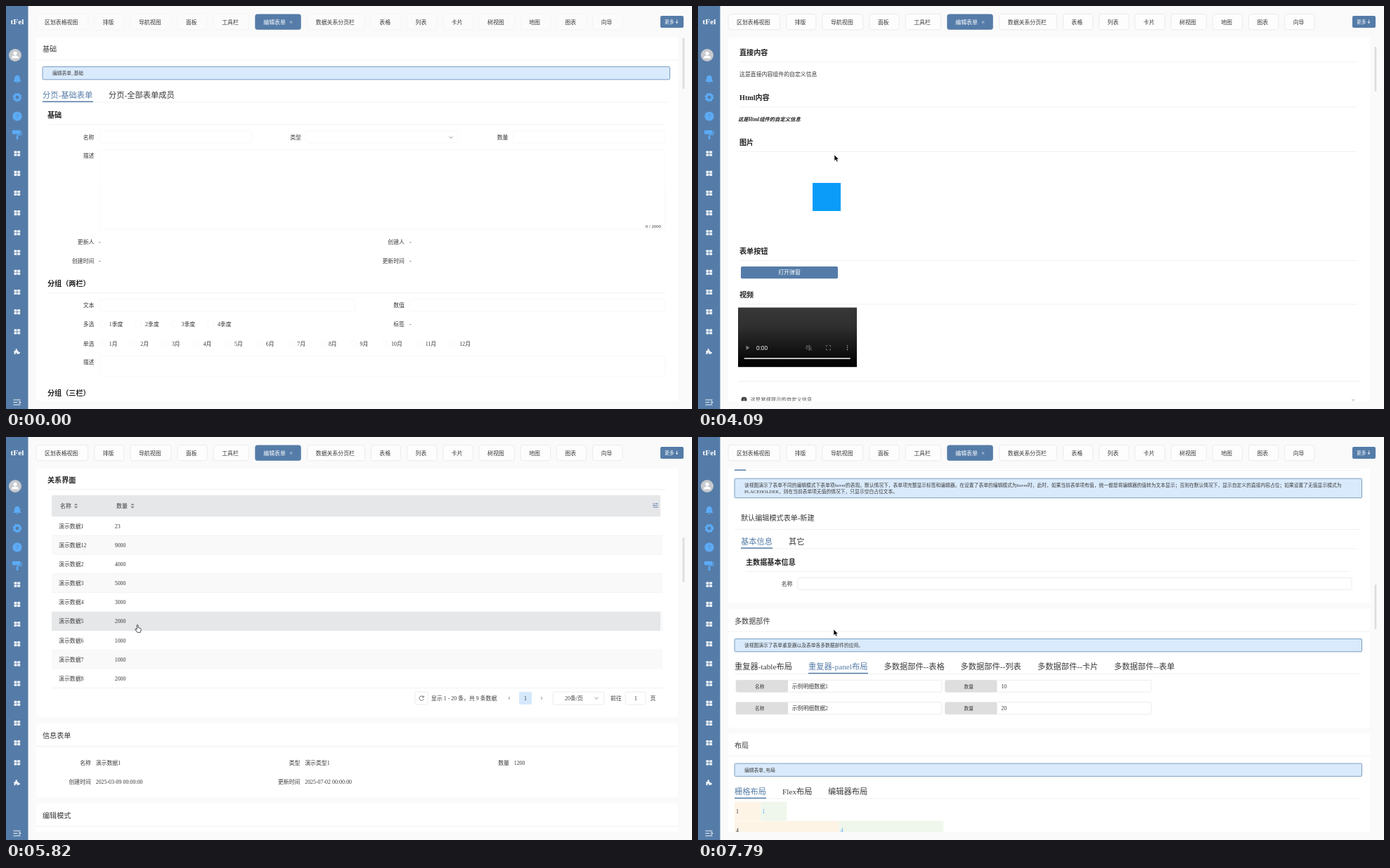
Recreate the animation shown at these times as an HTML page. Size 976 by 574 pixels, loop 8 s.

```html
<!DOCTYPE html>
<html>
<head>
<meta charset="utf-8">
<style>
html, body { margin: 0; width: 100%; height: 100%; overflow: hidden; background: #fafafa; }
svg { display: block; width: 976px; height: 574px; }
text { font-family: "Liberation Serif", "Noto Sans CJK SC", "Noto Sans CJK", serif; fill: #3a3a3a; white-space: pre; }
.b { font-weight: bold; fill: #222; }
.e { text-anchor: end; }
.m { text-anchor: middle; }
.blue { fill: #557ca8; }
.white { fill: #fff; }
.edge { stroke: #e7e7e7; stroke-width: .8; opacity: var(--edge, 1); }
.icon { fill: none; stroke: #777; stroke-width: .8; }
</style>
</head>
<body>
<svg id="stage" viewBox="0 0 976 574"></svg>
<script>
const S = 6.77, M = 7.9, L = 10.15, XL = 11.28;
const BLUE = '#557ca8', SKY = '#5cabf6', GREY = '#e6e7e9';

// ---- drawing helpers, all returning SVG markup
const text = (x, y, s, size = M, cls = '', extra = '') =>
  `<text x="${x}" y="${y + size * .37}" font-size="${size}" class="${cls}" ${extra}>${s}</text>`;
const rect = (x, y, w, h, fill, extra = '') =>
  `<rect x="${x}" y="${y}" width="${w}" height="${h}" fill="${fill}" ${extra}/>`;
const path = (d, extra = 'class="icon"') => `<path d="${d}" ${extra}/>`;
const circle = (x, y, r, fill, extra = '') => `<circle cx="${x}" cy="${y}" r="${r}" fill="${fill}" ${extra}/>`;
const shift = (dy, ...parts) => `<g transform="translate(0,${dy})">${parts.join('')}</g>`;
const each = (list, fn) => list.map(fn).join('');
const range = (n, fn) => each([...Array(n).keys()], fn);

const rule = (x, y, x2) => rect(x, y - .4, x2 - x, .8, '#ededed');
const underline = (x, y, w) => rect(x, y - .7, w, 1.5, BLUE);
const label = (x, y, s) => text(x, y, s, M, 'e');
const input = (x, y, x2, h = 17) => rect(x, y, x2 - x, h, '#fff', 'rx="2" class="edge"');
const group = (y, s, x = 59, x2 = 938) => text(x, y, s, L, 'b') + rule(x, y + 13.3, x2);
const card = (y, y2) => rect(43, y, 913, y2 - y, '#fff', 'rx="3"');
const panelTitle = (y, s) => text(52, y, s, L) + rule(43, y + 15, 956);
const chevron = (x, y) => path(`M${x - 2.5} ${y - 1.2}l2.5 2.5 2.5 -2.5`);
const cross = (x, y, c = '#999') => path(`M${x - 1.7} ${y - 1.7}l3.4 3.4m0 -3.4l-3.4 3.4`, `stroke="${c}" stroke-width=".7"`);
const notice = (y, h, ...lines) =>
  rect(52, y, 892.5, h, '#d9eafc', 'rx="1.5" stroke="#6f94bb" stroke-width=".9"') +
  lines.map((s, i) => text(66, y + 9.3 + i * 8.6, s, S)).join('');
const tabs = (y, size, active, items) =>
  items.map(([x, s], i) => text(x, y, s, size, i === active ? 'blue' : '')).join('');

// ---- fixed frame: sidebar and view tabs
function sidebar() {
  const grid = y => each([[-4.3, -3.5], [.4, -3.5], [-4.3, .4], [.4, .4]], ([dx, dy]) =>
    rect(15.8 + dx, y + dy, 4, 3.3, '#edf2f7', 'rx=".7"'));
  return rect(0, 0, 31.5, 574, BLUE) + text(16, 22, 'tFel', 11.4, 'b m', 'style="fill:#fff"') +
    circle(13, 70, 9, '#c6c9ce') + circle(13, 67.3, 2.6, '#fff') + path('M8 74.6q0-4 5-4t5 4z', 'fill="#fff"') +
    path('M10.5 108q1.5-1 1.5-4.500q0-4 4-5q4 1 4 5q0 3.500 1.500 4.500zM14.500 109h3l-1.500 1.500z', `fill="${SKY}"`) +
    circle(16, 130, 4, 'none', `stroke="${SKY}" stroke-width="3"`) +
    circle(16, 130, 5.6, 'none', `stroke="${SKY}" stroke-width="1.600" stroke-dasharray="2.200 2.200"`) +
    circle(16, 157, 6.6, SKY) + text(16, 157, '?', 8, 'm', 'style="fill:#557ca8"') +
    path('M9.500 177.500h10.500v4.500h-10.500zM20.500 179h1.500v4.500h-6v2', `fill="none" stroke="${SKY}"`) +
    rect(9.5, 177.5, 10.5, 4.5, SKY) + rect(14.7, 184.5, 2.6, 5.5, SKY) +
    range(10, i => grid(210 + i * 28.2)) +
    path('M11.500 496v-5h2.200q-1-2.800 1-2.800t1 2.800h1.800v2q2.500-1 2.500 1t-2.500 1v1h-2v-2h-1.800v2z', 'fill="#edf2f7"') +
    path('M10.500 561h10M10.500 564.500h6M10.500 568h10M18.500 562.800l2.200 1.700-2.200 1.700', 'fill="none" stroke="#edf2f7" stroke-width="1.200"');
}

function viewTabs() {
  const names = '区划表格视图 排版 导航视图 面板 工具栏 编辑表单 数据关系分页栏 表格 列表 卡片 树视图 地图 图表 向导'.split(' ');
  let x = 43;
  return each(names, name => {
    const active = name === '编辑表单', width = 27 + 7.87 * name.length + (active ? 7.5 : 0);
    const tab = rect(x, 11.5, width - .5, 22.3, active ? BLUE : '#fdfdfd', `rx="3.5" ${active ? '' : 'class="edge"'}`) +
      text(x + 12, 22.7, name, M, active ? 'white' : '') + (active ? cross(x + 51.3, 23, '#dce6f0') : '');
    x += width + 8.5;
    return tab;
  }) + rect(931, 14, 33, 17, BLUE, 'rx="2"') + text(937, 22, '更多', S, 'white') +
    path('M954.500 19.500v5m-1.800-1.800l1.800 1.800 1.800-1.800', 'fill="none" stroke="#fff" stroke-width=".8"');
}

// ---- page content
function basicForm() {
  return group(155.5, '基础') +
    label(125.5, 187, '名称') + input(133, 178, 350) +
    label(420, 187, '类型') + input(427, 178, 643) + chevron(633, 187) +
    label(714.5, 187, '数量') + input(721, 178, 938) +
    label(125.5, 213.5, '描述') + input(133, 205, 938, 113) + text(932, 313, '0 / 2000', S, 'e') +
    each([[336, '更新人', '创建人'], [363, '创建时间', '更新时间']], ([y, a, b]) =>
      label(125.5, y, a) + text(132, y, '-') + label(567, y, b) + text(574, y, '-')) +
    group(395.5, '分组（两栏）') +
    label(125.5, 426.5, '文本') + input(133, 418, 497) + label(567, 426.5, '数值') + input(574, 418, 938) +
    label(125.5, 453.5, '多选') + label(567, 453.5, '标签') + text(574, 453.5, '-') +
    range(4, i => rect(133 + i * 51.4, 449.5, 8, 8, '#fff', 'rx="1" class="edge"') + text(146.7 + i * 51.4, 453.5, `${i + 1}季度`)) +
    label(125.5, 481, '单选') +
    range(12, i => {
      const x = 146.7 + i * 44.6 + Math.max(0, i - 9) * 4;
      return circle(x - 9, 481, 4, '#fff', 'class="edge"') + text(x, 481, `${i + 1}月`);
    }) +
    label(125.5, 507.5, '描述') + input(133, 498.5, 938, 29) +
    group(551.5, '分组（三栏）');
}

function video() {
  return rect(57, 429.5, 169, 84.7, 'url(#dark)') +
    path('M68.500 483.500l5 3.300-5 3.300z', 'fill="#777"') +
    text(83, 486.7, '0:00', 8.2, 'white', 'style="font-family:Liberation Sans,sans-serif"') +
    path('M154 485.300h2l2.500-2.300v7.500l-2.500-2.300h-2zM160 484.500q2 2.300 0 4.500M154 483l8 8') +
    path('M182.500 485.500v-2h2M186.500 483.500h2v2M188.500 488v2h-2M184.500 490h-2v-2') +
    range(3, i => circle(212.5, 484 + i * 2.8, .8, '#aaa')) +
    rect(65.5, 501, 151.5, 2, '#bdbdbd', 'rx="1"');
}

function customForm() {
  const tip = (y, s, bg, color, dot) => rect(52, y - 9, 893, 18, bg) + circle(65.5, y + .3, 4, dot) +
    text(65.5, y + .3, 'i', 6.5, 'm white') + text(74.5, y, s, 7.33, '', `style="fill:${color}"`) + cross(932, y + 1);
  return shift(100,
    group(66.5, '直接内容'), text(59, 97.5, '这是直接内容组件的自定义信息'),
    group(130.5, 'Html内容'), text(57, 161.5, '这是Html组件的自定义信息', 7.33, 'b', 'font-style="italic"'),
    group(194, '图片'), rect(163, 252, 40, 40, '#0a9cf8'),
    group(349, '表单按钮'), rect(61, 371, 138, 17.3, BLUE, 'rx="2"'), text(130, 379.5, '打开弹窗', M, 'm white'),
    group(411.5, '视频'), video(), rule(57, 534.5, 943)) +
  shift(517,
    tip(143.5, '这是常规提示的自定义信息', '#fff', '#555', '#444'),
    tip(167, '这是错误提示的自定义信息', '#fdeeee', '#d2401c', '#a02a18'),
    tip(190.7, '这是警告提示的自定义信息', '#fdf7ec', '#f4a550', '#f49a2c'),
    group(215.5, 'iframe'), text(57, 242.3, '暂未支持的表单项类型: IFRAME 或找不到对应适配器', 9.03),
    group(267.3, '复合表单项'),
    label(125.5, 298, '时间范围'), input(133, 289.5, 189), input(194, 289.5, 253),
    label(567, 298, '数值范围'), input(574, 289.5, 687), input(692, 289.5, 804)) +
  shift(787, relationTable());
}

function relationTable() {
  const sort = x => path(`M${x - 2.7} 97.200l2.700-2.700 2.700 2.700zM${x - 2.7} 99l2.700 2.700 2.700-2.700z`, 'fill="#888"');
  const amounts = [23, 9000, 4000, 5000, 3000, 2000, 1000, 1000, 2000];
  return group(61, '关系界面') + rect(65, 83, 866, 30.5, GREY) +
    text(77, 98, '名称') + sort(99.5) + text(157, 98, '数量') + sort(180) +
    path('M920 95h8M920 97.500h8M920 100h8M925.500 94v2M922 96.500v2M925 99v2', `stroke="${BLUE}" stroke-width=".7"`) +
    amounts.map((amount, i) => {
      const y = 127 + i * 27.1;
      return rect(65, y - 13.5, 869, 27.1, i % 2 ? '#f9f9f9' : '#fff') + rule(65, y + 13.6, 934) +
        (i === 5 ? rect(65, y - 13.5, 866, 27.1, GREY, 'id="hoverRow"') : '') +
        text(75, y, '演示数据' + (i === 1 ? 12 : i || 1)) + text(154.7, y, amount);
    }).join('') +
    input(582, 363, 600, 18) + path('M594 370.500a3.200 3.200 0 1 0 .3 2.500M594.300 368.500v2.300h-2.300', 'fill="none" stroke="#555" stroke-width=".8"') +
    text(605, 372, '显示 1 - 20 条，共 9 条数据') +
    path('M717 370l-2 2 2 2M761 370l2 2-2 2') + rect(730, 363, 18, 18, '#d5e8fc', 'rx="2"') + text(739, 372, '1', M, 'm') +
    input(778, 363, 851, 18) + text(795, 372, '20条/页') + chevron(840, 372) +
    text(860, 372, '前往') + input(881, 363, 910, 18) + text(896, 372, '1', M, 'm') + text(916.5, 372, '页');
}

function lowerPanels() {
  const item = (x, y, name, value) => label(x, y, name) + text(x + 6.7, y, value);
  const detail = (y, n) => each([[54, '名称', '示例明细数据' + n, 347], [351.5, '数量', n * 10, 645]], ([x, name, value, x2]) =>
    input(x, y - 8.7, x2) + rect(x, y - 8.7, 74, 17.3, '#dedede', 'rx="2"') + text(x + 33.7, y, name, S, 'm') + text(x + 79.7, y, value));
  const cell = (x, y, w, n) => rect(x, y, w, 27, '#fdf4e6') + rect(x + w, y, w, 27, '#eff7ec') +
    text(x + 2, y + 13.5, n) + text(x + w + 2, y + 13.5, n, M, '', `style="fill:${SKY}"`);
  return shift(787, card(408, 513.5), panelTitle(425.5, '信息表单'),
      item(121, 464, '名称', '演示数据1'), item(418.5, 464, '类型', '演示类型1'), item(716, 464, '数量', '1200'),
      item(121, 491.3, '创建时间', '2025-03-09 00:00:00'), item(418.5, 491.3, '更新时间', '2025-07-02 00:00:00')) +
    shift(991, card(318, 573.5), panelTitle(335.5, '编辑模式'),
      tabs(374.5, M, 0, [[52, '默认'], [86, '无值显示直接内容占位'], [183, '无值显示空白占位文本']]),
      rule(52, 385, 943), underline(52, 384.5, 16),
      notice(396.7, 27.5, '该视图演示了表单不同的编辑模式下表单项hover的表现。默认情况下，表单项完整显示标签和编辑器。在设置了表单的编辑模式为hover时，此时，如果当前表单项有值，统一都是将编辑器的值转为文本显示；否则在默认情况下，显示自定义的直接内容占位；如果设置了无值显示模式为',
        'PLACEHOLDER，则在当前表单项无值的情况下，只显示空白占位文本。'),
      text(61, 452.5, '默认编辑模式表单-新建', L), rule(52, 469, 943),
      tabs(486, XL, 0, [[61, '基本信息'], [129, '其它']]), rule(61, 496.5, 938), underline(61, 495.7, 45),
      group(515.7, '主数据基本信息', 68, 925), label(134.5, 546.5, '名称'), input(142, 538, 930)) +
    shift(1328.5, card(244.5, 414), panelTitle(262, '多数据部件'),
      notice(287.5, 18.3, '该视图演示了表单重复器以及表单各多数据部件的应用。'),
      tabs(327, XL, 1, [[52, '重复器-table布局'], [157, '重复器-panel布局'], [264.5, '多数据部件--表格'],
        [373.5, '多数据部件--列表'], [483, '多数据部件--卡片'], [592, '多数据部件--表单']]),
      rule(52, 337.5, 943), underline(157, 336.5, 85), detail(355, 1), detail(386.5, 2),
      card(422.5, 800), panelTitle(439.5, '布局'), notice(465, 18.3, '编辑表单_布局'),
      tabs(505, XL, 0, [[52, '栅格布局'], [120, 'Flex布局'], [185, '编辑器布局']]),
      rule(52, 515, 943), underline(52, 514.3, 45), cell(52, 519.5, 37.3, 1), cell(52, 546.8, 148.7, 4));
}

const $ = id => document.getElementById(id);
$('stage').innerHTML = `
  <defs>
    <clipPath id="view"><rect x="32" y="45" width="926" height="517.500"/></clipPath>
    <linearGradient id="dark" x2="0" y2="1"><stop stop-color="#383838"/><stop offset=".3" stop-color="#303030"/><stop offset="1" stop-color="#000"/></linearGradient>
  </defs>
  ${rect(0, 0, 976, 574, '#fafafa')}${sidebar()}${viewTabs()}
  <g clip-path="url(#view)"><g id="page">
    ${card(45, 1186)}
    ${text(52, 61.5, '基础', L)}${rule(43, 77, 956)}${notice(86.5, 18.3, '编辑表单_基础')}${rule(52, 137, 941)}
    ${text(52, 126.5, '分页-基础表单', XL, '', 'id="tabA"')}${text(146, 126.5, '分页-全部表单成员', XL, '', 'id="tabB"')}
    <rect id="ink" y="135.500" height="1.500" fill="${BLUE}"/>
    <g id="paneA">${basicForm()}</g>
    <g id="paneB">${customForm()}${lowerPanels()}</g>
  </g></g>
  <rect id="thumb" x="962.500" width="2.800" rx="1.400" fill="#dddee1"/>
  <g id="cursor">
    ${path('M0 0v8.700l2-1.900 1.500 3.200 1.500-.7-1.400-3h2.700z', 'id="arrow" fill="#000" stroke="#fff" stroke-width=".5"')}
    ${path('M-.8 0q1-1 1.800 0v3.500l3.500 1q1 .5.700 2l-.8 3.800h-4.600l-3-4q-.3-1.200 1-1l1.400 1z', 'id="hand" fill="#fff" stroke="#222" stroke-width=".8"')}
  </g>`;

// ---- motion: keys are [time, ...values], eased between neighbours
const SCROLL = [[3580, 0], [3980, 100], [4190, 100], [4380, 314.5], [4610, 314.5], [4760, 517], [5560, 517], [5820, 787],
  [6050, 787], [6330, 991], [7050, 991], [7420, 1193.5], [7600, 1193.5], [7790, 1328.5]];
const CURSOR = [[760, 976, 560], [1560, 420, 260], [1850, 185, 127], [2120, 194, 125.5], [3280, 194, 125.5], [3600, 194, 212],
  [4190, 194, 212], [4760, 184, 263], [5560, 184, 263], [5760, 187, 268], [6330, 187, 268], [6480, 190.5, 272],
  [7600, 190.5, 272], [7790, 193, 274]];
const INK = [[2720, 52, 72], [3010, 146, 94]];
const EDGE = [[310, .35], [490, 1]];

function at(keys, t) {
  const next = keys.findIndex(k => k[0] > t);
  if (next <= 0) return keys.at(next).slice(1);
  const a = keys[next - 1], b = keys[next];
  const p = (t - a[0]) / (b[0] - a[0]), e = p * p * (3 - 2 * p);
  return a.slice(1).map((v, i) => v + (b[i + 1] - v) * e);
}
const within = (t, from, to) => t >= from && t < to;
const show = (id, on) => $(id).setAttribute('visibility', on ? 'visible' : 'hidden');
const set = (id, attrs) => Object.entries(attrs).forEach(([k, v]) => $(id).setAttribute(k, v));

function draw(now) {
  const t = now % 8000, second = t >= 2720;
  const [scroll] = at(SCROLL, t), [x, y] = at(CURSOR, t), [inkX, inkWidth] = at(INK, t);
  const pointing = within(t, 1850, 3350) || within(t, 5760, 6400);
  $('stage').style.setProperty('--edge', at(EDGE, t)[0]);
  set('page', { transform: `translate(0,${-scroll})` });
  set('ink', { x: inkX, width: inkWidth });
  set('thumb', { y: 45.5 + scroll * .1238, height: second ? 64 : 73 });
  set('tabA', { class: second ? '' : 'blue' });
  set('tabB', { class: t >= 1850 ? 'blue' : '' });
  $('paneA').style.display = second ? 'none' : '';
  $('paneB').style.display = second ? '' : 'none';
  show('hoverRow', within(t, 5760, 6070));
  set('cursor', { transform: `translate(${x},${y})` });
  show('arrow', t >= 760 && !pointing);
  show('hand', pointing);
  requestAnimationFrame(draw);
}
requestAnimationFrame(draw);
</script>
</body>
</html>
```
